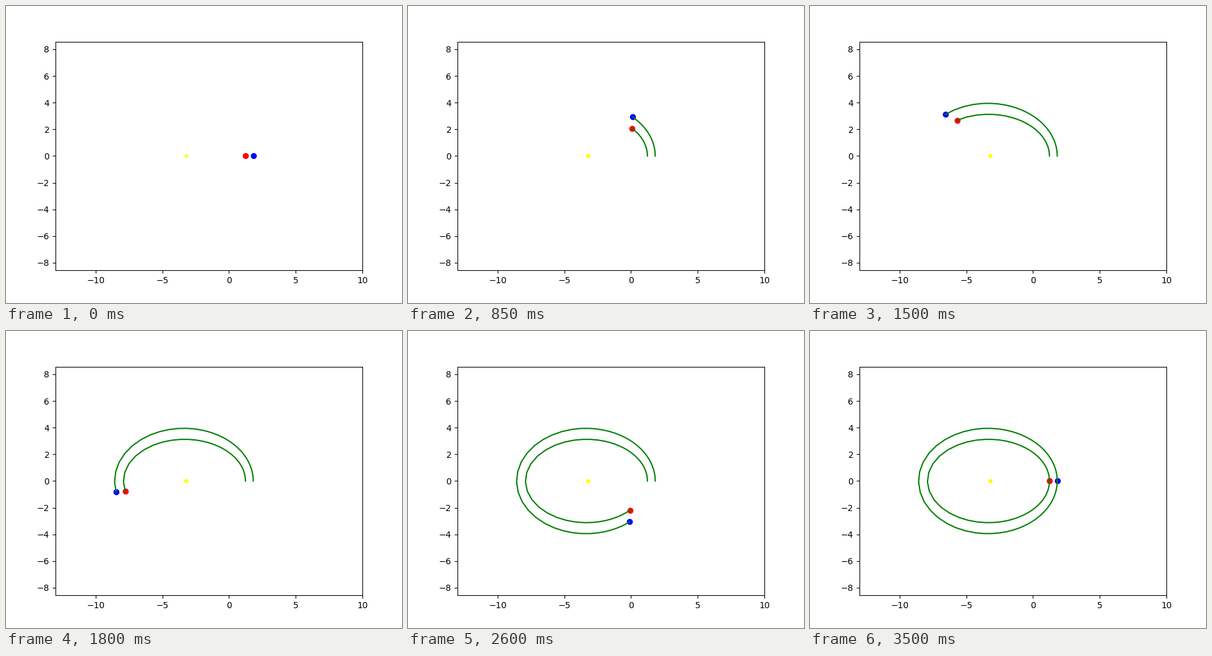
Write a matplotlib script that moves like this. It is 640 px wide and 480 px high and loops after 3.55 s.

```python
import numpy as np
import matplotlib.pyplot as plt
from matplotlib.animation import FuncAnimation

FRAMES = 71
INTERVAL = 50
STEP = 0.09       # radians swept per frame
STAR_LAYERS = 24  # stacked star dots sharpen the soft edge


def orbit(p, e):
    """Ellipse in polar form, with one focus at the origin."""
    theta = STEP * np.arange(FRAMES)
    r = p / (1 + e * np.cos(theta))
    return r * np.cos(theta), r * np.sin(theta)


fig, ax = plt.subplots(figsize=(6.4, 4.8), dpi=100)
ax.set_xlim(-13, 10)
ax.set_ylim(-8.5694, 8.5694)

star = [ax.plot(-3.2, 0, ".", color="yellow")[0] for _ in range(STAR_LAYERS)]

planets = []
for color, p, e in (("red", 2.135, 0.73), ("blue", 3.0, 0.65)):
    x, y = orbit(p, e)
    dot, = ax.plot([], [], "o", color=color, zorder=2)
    trail, = ax.plot([], [], color="green", zorder=3)
    planets.append((x, y, dot, trail))


def update(i):
    for k, layer in enumerate(star):
        layer.set_visible(k <= i)
    for x, y, dot, trail in planets:
        dot.set_data([x[i]], [y[i]])
        trail.set_data(x[:i + 1], y[:i + 1])
    return []


anim = FuncAnimation(fig, update, frames=FRAMES, interval=INTERVAL,
                     init_func=lambda: update(0), repeat=True)
plt.show()
```
